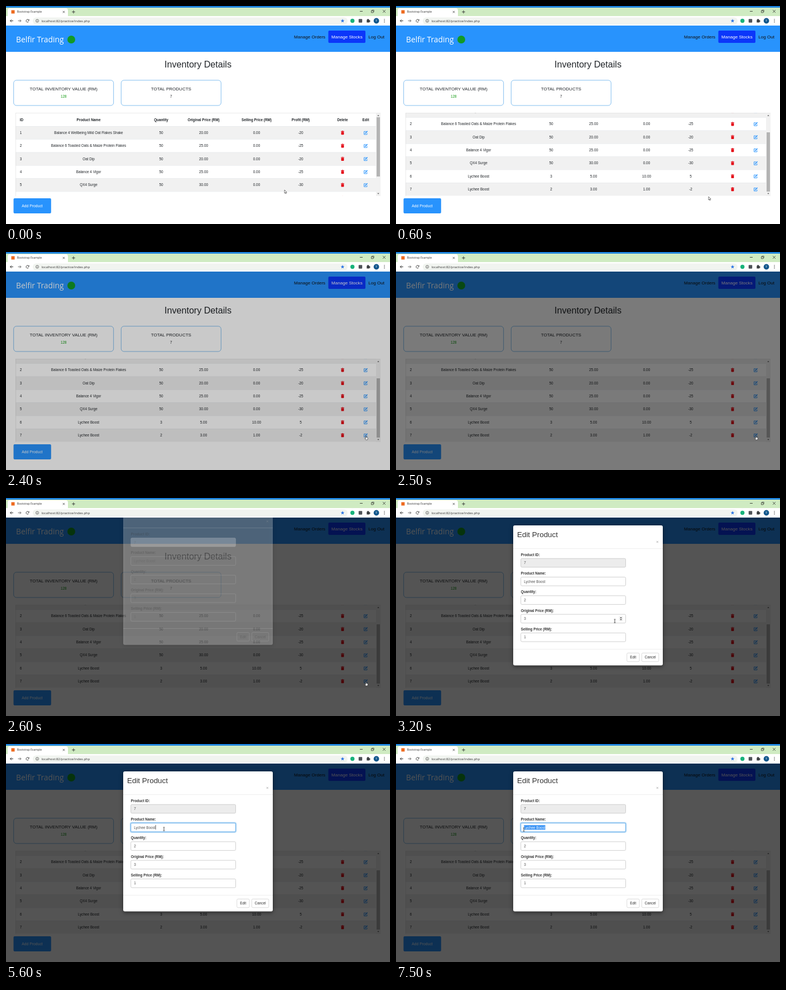
Recreate the animation shown at these times as an HTML page with a canvas. Size 688 by 390 pixels, loop 8 s.

```html
<!DOCTYPE html>
<html lang="en">
<head>
<meta charset="utf-8">
<title>Inventory Details</title>
<style>
  html, body { margin: 0; width: 100%; height: 100%; overflow: hidden; background: #fff; }
  canvas { display: block; }
</style>
</head>
<body>
<canvas id="stage" width="688" height="390"></canvas>
<script>
const ctx = document.getElementById('stage').getContext('2d');
const W = 688, H = 390, LOOP = 8000, STEP = 100;
const SANS = '"Liberation Sans", Arial, sans-serif';
const UI = '"Open Sans", "Noto Sans", sans-serif';
const BLUE = '#2893fd', INK = '#212529';
const TOP = 35;                       // bottom edge of the browser bar
const PITCH = 23.35, FIELD_PITCH = 33.3;

const products = [
  ['Balance 4 Wellbeing Mild Oat Flakes Shake', 50, '20.00', '0.00', -20],
  ['Balance 6 Toasted Oats & Maize Protein Flakes', 50, '25.00', '0.00', -25],
  ['Oat Dip', 50, '20.00', '0.00', -20],
  ['Balance 4 Vigor', 50, '25.00', '0.00', -25],
  ['QX4 Surge', 50, '30.00', '0.00', -30],
  ['Lychee Boost', 3, '5.00', '10.00', 5],
  ['Lychee Boost', 2, '3.00', '1.00', -2]
];
const heads = ['Product Name', 'Quantity', 'Original Price (RM)', 'Selling Price (RM)', 'Profit (RM)', 'Delete', 'Edit'];
const cols = [148, 278, 354, 449, 528, 603, 644.5];
const fields = [
  ['Product ID:', '7'], ['Product Name:', 'Lychee Boost'], ['Quantity:', '2'],
  ['Original Price (RM):', '3'], ['Selling Price (RM):', '1']
];

// Keyframes as [time, value], joined by straight lines.
const scrollKeys = [[0, 0], [100, 8], [400, 39]];
const dimKeys = [[2300, 0], [2400, .21], [2500, .52], [2600, .67]];
const fadeKeys = [[2500, 0], [2600, .27], [2700, .85], [2800, 1]];
const slideKeys = [[2500, -60], [2600, -36.7], [2700, -13], [2800, -3], [2900, 0]];
const cursorX = [[300, 499], [600, 560], [900, 613], [1300, 613], [1700, 644], [1900, 645], [2600, 645],
  [2800, 585], [3000, 440], [3200, 392], [3500, 350], [3800, 300], [4100, 284], [4300, 283],
  [6300, 283], [6600, 254], [6900, 229]];
const cursorY = [[300, 329], [600, 341], [900, 333], [1300, 333], [1700, 329], [2600, 329],
  [2800, 300], [3000, 240], [3200, 220], [3500, 190], [3800, 160], [4100, 152], [6300, 152], [6900, 153]];

function track(keys, t) {
  if (t <= keys[0][0]) return keys[0][1];
  for (let i = 1; i < keys.length; i++) {
    const [t0, v0] = keys[i - 1], [t1, v1] = keys[i];
    if (t <= t1) return v0 + (v1 - v0) * (t - t0) / (t1 - t0);
  }
  return keys[keys.length - 1][1];
}

function rect(x, y, w, h, color) {
  ctx.fillStyle = color;
  ctx.fillRect(x, y, w, h);
}

function box(x, y, w, h, r, fill, stroke, width = .7) {
  ctx.beginPath();
  ctx.roundRect(x, y, w, h, r);
  if (fill) { ctx.fillStyle = fill; ctx.fill(); }
  if (stroke) { ctx.strokeStyle = stroke; ctx.lineWidth = width; ctx.stroke(); }
}

function dot(x, y, r, color) {
  ctx.beginPath();
  ctx.arc(x, y, r, 0, 7);
  ctx.fillStyle = color;
  ctx.fill();
}

// points: flat list of x, y pairs
function path(points, color, width, closed) {
  ctx.beginPath();
  for (let i = 0; i < points.length; i += 2) ctx.lineTo(points[i], points[i + 1]);
  if (closed) ctx.closePath();
  ctx.strokeStyle = color;
  ctx.lineWidth = width;
  ctx.stroke();
}

function shape(points, fill, outline) {
  ctx.beginPath();
  for (let i = 0; i < points.length; i += 2) ctx.lineTo(points[i], points[i + 1]);
  ctx.closePath();
  ctx.fillStyle = fill;
  ctx.fill();
  if (outline) { ctx.strokeStyle = outline; ctx.lineWidth = .6; ctx.stroke(); }
}

// y is the middle of the capitals
function text(str, x, y, size, color = INK, align = 'left', weight = 400, family = SANS) {
  ctx.font = `${weight} ${size}px ${family}`;
  ctx.textAlign = align;
  ctx.fillStyle = color;
  ctx.fillText(str, x, y + size * .36);
}

function cross(x, y, r, color, width = .8) {
  path([x - r, y - r, x + r, y + r], color, width);
  path([x - r, y + r, x + r, y - r], color, width);
}

function at(x, y, draw) {
  ctx.save();
  ctx.translate(x, y);
  draw();
  ctx.restore();
}

function trash(x, y) {
  at(x, y, () => {
    rect(-2.9, -2.9, 5.8, 1, '#e3000f');
    rect(-1, -3.5, 2, .8, '#e3000f');
    box(-2.4, -1.5, 4.8, 5, .7, '#e3000f');
  });
}

function pencil(x, y) {
  at(x, y, () => {
    path([.6, -2.3, -3, -2.3, -3, 3.2, 2.4, 3.2, 2.4, .6], BLUE, .9);
    path([-.9, 1.1, 3, -2.8], BLUE, 1.5);
    shape([-1.8, 2, -1.4, .2, 0, 1.6], BLUE);
  });
}

function drawBrowser() {
  rect(0, 0, W, 3, '#2185dc');
  rect(0, 3, W, 15, '#cfebc2');
  box(3, 4, 108, 16, [4, 4, 0, 0], '#fff');
  rect(0, 18, W, TOP - 18, '#fff');
  rect(9.5, 7.5, 6, 6, '#ee6a1f');
  text('Bootstrap Example', 19.7, 10.6, 5, '#333', 'left', 400, UI);
  cross(103.5, 10.6, 1.7, '#333');
  path([118.2, 10.6, 123.8, 10.6], '#333', .9);
  path([121, 7.8, 121, 13.4], '#333', .9);

  path([634, 9.5, 639, 9.5], '#222', .8);
  path([654.5, 8.4, 658, 8.4, 658, 11.9, 654.5, 11.9], '#222', .7, true);
  path([655.7, 8, 655.7, 7.2, 659.2, 7.2, 659.2, 10.6, 658.4, 10.6], '#222', .6);
  cross(677.5, 9.5, 2.3, '#222');

  path([13, 26.5, 7.5, 26.5], '#444', 1);
  path([10, 24, 7.5, 26.5, 10, 29], '#444', 1);
  path([21.5, 26.5, 27, 26.5], '#777', 1);
  path([24.5, 24, 27, 26.5, 24.5, 29], '#777', 1);
  ctx.beginPath();
  ctx.arc(38.5, 26.5, 2.5, .5, 5.6);
  ctx.strokeStyle = '#444';
  ctx.lineWidth = 1;
  ctx.stroke();
  shape([41.6, 23.4, 41.6, 26.3, 38.9, 26.3], '#444');

  box(48, 20.5, 564, 12.5, 6.2, '#f1f4f0');
  ctx.beginPath();
  ctx.arc(56, 26.5, 2.6, 0, 7);
  ctx.lineWidth = .7;
  ctx.stroke();
  path([56, 26.2, 56, 28], '#444', .7);
  path([56, 24.8, 56, 25.5], '#444', .7);
  text('localhost:82/practice/index.php', 63.5, 26.6, 5.93, '#333', 'left', 400, UI);

  const star = [];
  for (let i = 0; i < 10; i++) {
    const a = -Math.PI / 2 + i * Math.PI / 5, r = i % 2 ? 1.5 : 3.6;
    star.push(603 + r * Math.cos(a), 26.6 + r * Math.sin(a));
  }
  shape(star, '#2571e3');
  dot(620.7, 26.5, 3.7, '#18b27a');
  box(631.8, 23.3, 6.4, 6.4, 1, '#4d5156');
  box(646.3, 24.6, 5, 5, .5, '#3c4043');
  dot(648.6, 24.2, 1.2, '#3c4043');
  dot(651.5, 27, 1.2, '#3c4043');
  dot(663.6, 26.5, 4.9, '#12578c');
  text('Y', 663.6, 26.6, 4.6, '#fff', 'center');
  [-2.5, 0, 2.5].forEach(d => dot(678, 26.5 + d, .75, '#444'));
}

function drawCard(x, w, title, value, color) {
  box(x, 132.8, w, 45.2, 5, '#fff', '#74b7ee', .9);
  text(title, x + w / 2, 148.3, 8, INK, 'center');
  text(value, x + w / 2, 161.5, 6.35, color, 'center');
}

function drawTable(scroll) {
  ctx.save();
  ctx.beginPath();
  ctx.rect(17, 191.6, 654, 148.4);
  ctx.clip();
  ctx.translate(0, -scroll);
  text('ID', 24.7, 203.4, 6.35, INK, 'left', 700);
  heads.forEach((h, i) => text(h, cols[i], 203.4, 6.35, INK, 'center', 700));
  products.forEach((p, i) => {
    const top = 215 + PITCH * i, y = top + 11.7;
    if (i % 2 === 0) rect(17, top, 646, PITCH, '#f1f1f1');
    rect(17, top, 646, .5, '#dee2e6');
    text(String(i + 1), 24.7, y, 6.35);
    p.forEach((v, c) => text(String(v), cols[c], y, 6.35, INK, 'center'));
    trash(cols[5], y);
    pencil(cols[6], y);
  });
  ctx.restore();

  rect(17, 191.4, 654, .6, '#ddd');
  rect(17, 191.4, .6, 148.6, '#ddd');
  rect(663, 192, 8, 148, '#f1f1f1');
  rect(664, 199 + scroll * 27 / 39, 6, 106, '#b4b4b4');
  shape([665.4, 196.8, 668.6, 196.8, 667, 194.8], '#555');
  shape([665.4, 334.8, 668.6, 334.8, 667, 336.8], '#555');
}

function drawPage(scroll) {
  rect(0, 0, W, H, '#fff');
  rect(0, TOP, W, 47, BLUE);
  text('Belfir Trading', 18, 60, 13.8, '#fff', 'left', 400, UI);
  dot(117, 60, 7, '#129a26');
  box(577.5, 44, 66.5, 22, 2, '#0b36fa');
  text('Manage Orders', 516, 55.2, 8.08, '#111');
  text('Manage Stocks', 583, 55.2, 8.08, '#fff');
  text('Log Out', 649.3, 55.2, 8.08, '#111');
  text('Inventory Details', 344, 104, 16.1, INK, 'center');
  drawCard(13.7, 179, 'TOTAL INVENTORY VALUE (RM)', '128', '#129a12');
  drawCard(206.3, 179, 'TOTAL PRODUCTS', '7', INK);
  drawTable(scroll);
  box(13.5, 344, 67.3, 27, 2, BLUE);
  text('Add Product', 47, 357.6, 6.8, '#fff', 'center');
}

const fieldY = i => 116 + FIELD_PITCH * i;

function fieldUnder(x, y) {
  if (x < 223 || x > 412) return -1;
  return fields.findIndex((f, i) => Math.abs(y - fieldY(i)) < 8);
}

function drawSelection(str, x, y, mouseX) {
  ctx.font = `400 6.35px ${SANS}`;
  const edge = n => x + ctx.measureText(str.slice(0, n)).width;
  ctx.textAlign = 'left';
  let n = str.length;
  while (n > 0 && (edge(n) + edge(n - 1)) / 2 > mouseX) n--;
  const from = edge(n), to = edge(str.length);
  if (to - from < .1) return;
  rect(from, y - 4, to - from, 8, '#3390f5');
  ctx.save();
  ctx.beginPath();
  ctx.rect(from, y - 5, to - from, 10);
  ctx.clip();
  text(str, x, y, 6.35, '#fff');
  ctx.restore();
}

function drawModal(t, mx, my) {
  const alpha = track(fadeKeys, t);
  if (!alpha) return;
  ctx.save();
  ctx.globalAlpha = alpha;
  ctx.translate(0, track(slideKeys, t));
  ctx.save();
  ctx.shadowColor = 'rgba(0,0,0,.5)';
  ctx.shadowBlur = 7;
  ctx.shadowOffsetY = 2;
  box(210, 49, 268, 250.5, 3, '#fff');
  ctx.restore();
  text('Edit Product', 217, 65.5, 13.4, '#333');
  cross(468.3, 78.5, 1.6, '#aaa', .9);
  rect(210, 90, 268, .6, '#e3e3e3');
  rect(210, 270, 268, .6, '#e3e3e3');

  const hover = fieldUnder(mx, my);
  fields.forEach(([label, value], i) => {
    const y = fieldY(i), focused = i === 1 && t >= 4200;
    text(label, 223.8, y - 14.5, 6.3, '#333', 'left', 700);
    if (focused) box(223, 140.8, 189, 17, 2.5, null, 'rgba(102,175,233,.45)', 2.4);
    box(223.7, y - 7.8, 187.8, 15.6, 2, i ? null : '#ececec', focused ? '#55a5ea' : '#c4c4c4', .8);
    text(value, 229.3, y, 6.35, '#555');
    if (i === 3 && hover === 3 && t >= 2900) {
      rect(399.5, y - 4.5, 7, 9, '#f0f0f0');
      shape([401.2, y - .8, 404.8, y - .8, 403, y - 2.8], '#444');
      shape([401.2, y + .8, 404.8, y + .8, 403, y + 2.8], '#444');
    }
  });

  const caretOn = t >= 4200 && t < 6400 && Math.floor((t - 4200) / 533) % 2 === 0;
  if (caretOn) rect(267.7, 144.8, .7, 8.2, '#222');
  if (t >= 6400) drawSelection(fields[1][1], 229.3, fieldY(1), mx);

  box(413.7, 277.3, 22.3, 15.4, 2, null, '#ccc');
  text('Edit', 424.8, 285, 6.4, '#333', 'center');
  box(440.3, 277.3, 30.5, 15.4, 2, null, '#ccc');
  text('Cancel', 455.5, 285, 6.4, '#333', 'center');
  ctx.restore();
}

function drawCursor(t, x, y) {
  const overField = t >= 2900 && fieldUnder(x, y) > 0;
  at(x, y, () => {
    if (overField) {
      path([0, -2.7, 0, 3], '#222', .8);
      path([-1.4, -3, 1.4, -3], '#222', .7);
      path([-1.4, 3.2, 1.4, 3.2], '#222', .7);
    } else if (t >= 1900 && t < 2700) {
      shape([-.6, .2, .5, .2, .6, 2.6, 3, 3.2, 3.3, 4.4, 2.6, 7, -.3, 7, -2, 4.6, -1.5, 4, -.6, 4.7], '#fff', '#222');
    } else {
      shape([0, 0, 0, 6, 1.4, 4.8, 2.3, 6.8, 3.2, 6.4, 2.3, 4.4, 4.2, 4.3], '#fff', '#222');
    }
  });
}

function render(now) {
  const t = Math.floor((now % LOOP) / STEP) * STEP;
  const x = track(cursorX, t), y = track(cursorY, t);
  drawPage(track(scrollKeys, t));
  rect(0, TOP, W, H - TOP, `rgba(0,0,0,${track(dimKeys, t)})`);
  drawModal(t, x, y);
  drawBrowser();
  drawCursor(t, x, y);
}

const start = performance.now();
function tick() {
  render(performance.now() - start);
  requestAnimationFrame(tick);
}
tick();
</script>
</body>
</html>
```
